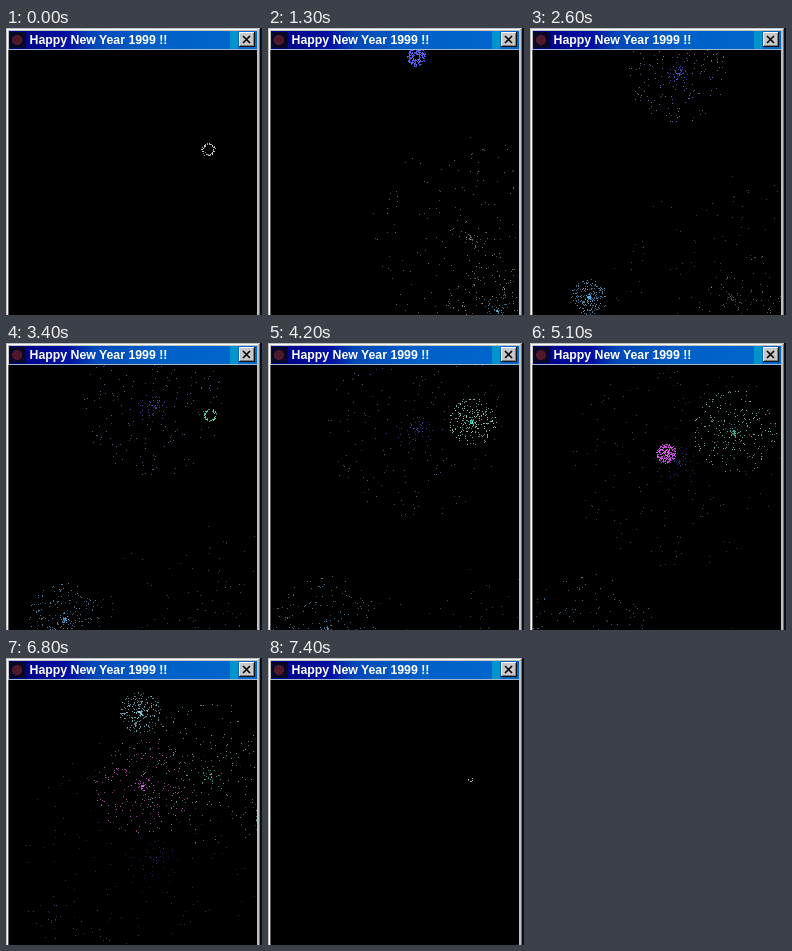
These frames come from a looping animation (256x287 px, 7.5 s). An HTML page with a canvas:

```html
<!DOCTYPE html>
<html lang="en">
<head>
<meta charset="utf-8">
<title>Happy New Year</title>
<style>
  html, body { margin: 0; width: 100%; height: 100%; overflow: hidden; background: #000; }
  canvas, svg { position: absolute; left: 0; top: 0; display: block; }
  text { font: bold 12.3px "Liberation Sans", Arial, sans-serif; fill: #fff; }
</style>
</head>
<body>
<canvas id="sky" width="256" height="287"></canvas>
<svg width="256" height="287" viewBox="0 0 256 287" shape-rendering="crispEdges">
  <defs>
    <linearGradient id="bar">
      <stop offset="0" stop-color="#000080"/>
      <stop offset=".24" stop-color="#0010a0"/>
      <stop offset=".34" stop-color="#0048b8"/>
      <stop offset=".6" stop-color="#0060c8"/>
      <stop offset="1" stop-color="#0068cc"/>
    </linearGradient>
  </defs>
  <path d="M0 0H254V3H3V287H0Z" fill="#c0c0c0"/>
  <path d="M1 1H252V2H2V287H1Z" fill="#fff"/>
  <path d="M2 22H3V287H2Z" fill="#606060"/>
  <path d="M251 2H253V287H251Z" fill="#c0c0c0"/>
  <path d="M253 1H254V287H253Z" fill="#707078"/>
  <path d="M254 0H256V287H254Z" fill="#081020"/>
  <path d="M3 3H251V21H3Z" fill="url(#bar)"/>
  <path d="M224 3H232V21H224Z" fill="#0094cc"/>
  <path d="M3 21H251V22H3Z" fill="#a0b8d0"/>
  <path d="M4 4H20V20H4Z" fill="#080828"/>
  <circle cx="11" cy="12" r="5" fill="#501828"/>
  <text x="23.5" y="16">Happy New Year 1999 !!</text>
  <path d="M233 4H249V19H233Z" fill="#101010"/>
  <path d="M233 4H248V18H233Z" fill="#fff"/>
  <path d="M234 5H248V18H234Z" fill="#808080"/>
  <path d="M234 5H247V17H234Z" fill="#c8c8c8"/>
  <path d="M237 8L244 15M244 8L237 15" stroke="#000" stroke-width="1.6" shape-rendering="auto"/>
</svg>
<script>
const LOOP = 7500, STEP = 100;
const sky = document.getElementById("sky").getContext("2d");

// birth is in show seconds; pace scales how fast a burst ages
const bursts = [
  { birth: -0.02, x: 202, y: 121, pace: 1, drop: 10, core: "#d8d8d0", rim: "#c4bca8" },
  { birth: 0.63, x: 229, y: 260, pace: 1, drop: 6, core: "#60b8e0", rim: "#c4b8a4" },
  { birth: 1.2, x: 148, y: 28, pace: 1, drop: 6, core: "#6068ff", rim: "#8c88d0" },
  { birth: 2.13, x: 59, y: 266, pace: 0.75, drop: 6, core: "#58b8f8", rim: "#6898c0" },
  { birth: 3.38, x: 204, y: 72, pace: 0.65, drop: 10, core: "#50e0c0", rim: "#a0dcc0" },
  { birth: 4.93, x: 136, y: 109, pace: 0.72, drop: 8, core: "#f060ff", rim: "#e074d0" },
  { birth: 6.18, x: 134, y: 50, pace: 0.7, drop: 8, core: "#90d0e8", rim: "#88b8c8" }
];

function seeded(seed) {
  return () => (seed = (seed * 16807) % 2147483647) / 2147483647;
}

bursts.forEach((burst, i) => {
  const rand = seeded(7919 * (i + 3));
  burst.sparks = Array.from({ length: 240 }, (_, k) => {
    const inner = k % 9 === 0;
    return {
      angle: rand() * Math.PI * 2,
      speed: inner ? rand() * 0.12 : rand() ** 0.65,
      ring: 0.75 + rand() * 0.3,
      glow: 0.6 + rand() * 0.4,
      inner
    };
  });
});

// The opening burst runs fast until the sky fills up.
function showTime(t) {
  if (t < 0) return t;
  return t < 1.2 ? t * 2.8 : 3.36 + t - 1.2;
}

const radius = age => age < 0 ? 2 : 6 + 35 * age - 2.2 * age * age;

function drawBurst(burst, t) {
  if (t < burst.birth - 0.1) return;
  const age = (showTime(t) - showTime(burst.birth)) * burst.pace;
  const size = radius(age);
  const cy = burst.y + (age > 0 ? burst.drop * age + 4.4 * age * age : 0);
  const spread = Math.min(1, Math.max(0, age / 0.15));
  const count = age < 0 ? 7 : age < 0.06 ? 56 : burst.sparks.length;
  const fade = Math.max(0.4, 1 - Math.max(0, age) * 0.12);
  for (const s of burst.sparks.slice(0, count)) {
    const dist = size * (s.ring + (s.speed - s.ring) * spread);
    sky.globalAlpha = fade * s.glow;
    sky.fillStyle = s.inner || s.speed < 0.25 || age < 0.15 ? burst.core : burst.rim;
    sky.fillRect(Math.round(burst.x + dist * Math.cos(s.angle)),
                 Math.round(cy + dist * Math.sin(s.angle)), 1, 1);
  }
}

function draw(ms) {
  let t = Math.floor((ms % LOOP) / STEP) * STEP / 1000;
  if (t >= 7.4) t -= LOOP / 1000;
  sky.globalAlpha = 1;
  sky.fillStyle = "#000";
  sky.fillRect(0, 0, 256, 287);
  bursts.forEach(burst => drawBurst(burst, t));
}

const start = performance.now();
function tick() {
  draw(performance.now() - start);
  requestAnimationFrame(tick);
}
tick();
</script>
</body>
</html>
```
